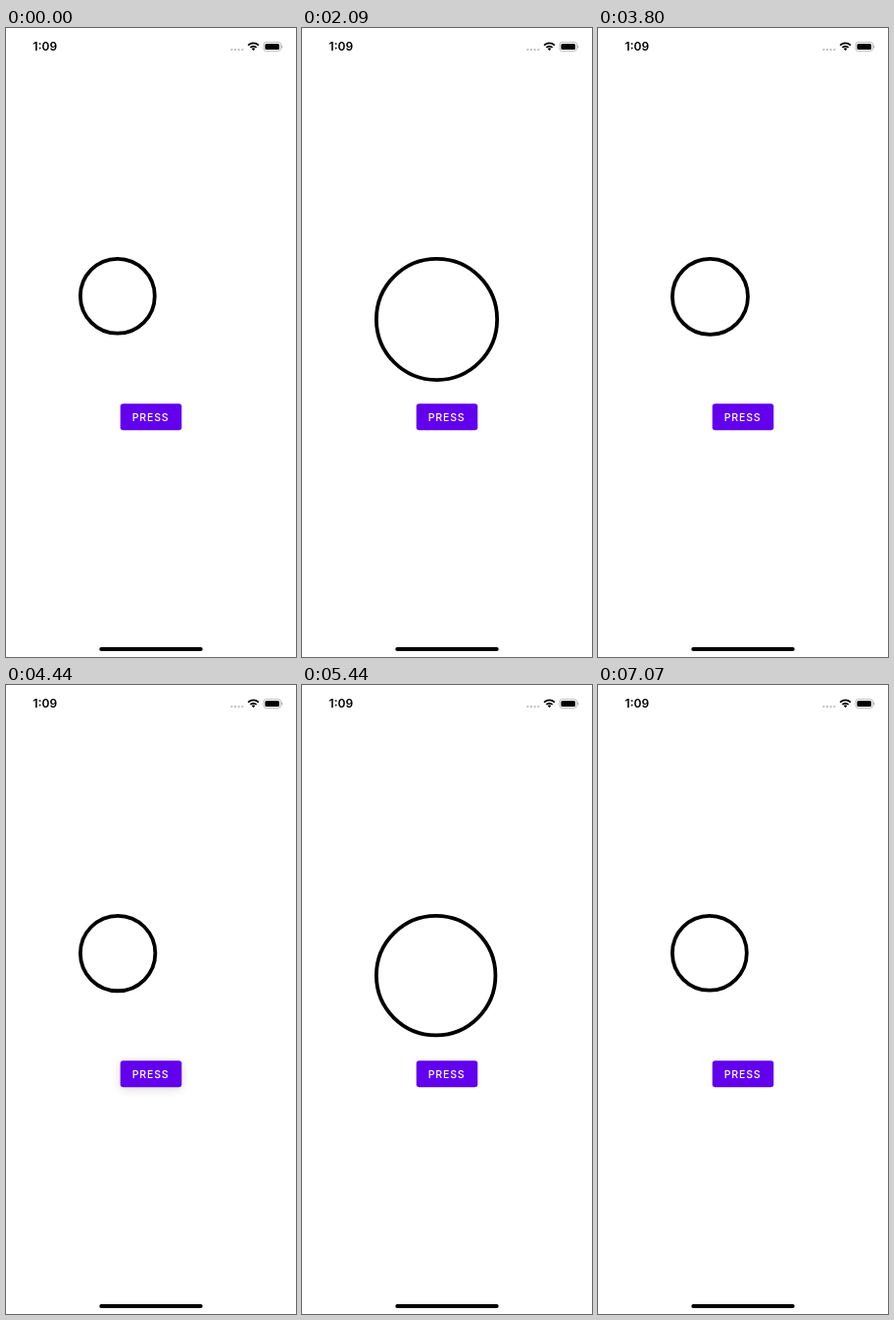
Animation of 296x640 px, one loop 7.1 s. Source, as an HTML page with a canvas:

```html
<!DOCTYPE html>
<html lang="en">
<head>
<meta charset="utf-8">
<title>Spring circle</title>
<style>
html, body { margin: 0; width: 100%; height: 100%; overflow: hidden; background: #fff; }
canvas { display: block; width: 296px; height: 640px; }
</style>
</head>
<body>
<canvas id="stage"></canvas>
<script>
const W = 296, H = 640, LOOP = 7100;
const PT = W / 390; // layout points to pixels
const FONT = 'Inter, Roboto, "Liberation Sans", sans-serif';
const canvas = document.getElementById('stage');
const ctx = canvas.getContext('2d');
const dpr = window.devicePixelRatio || 1;
canvas.width = W * dpr;
canvas.height = H * dpr;

// Each press: finger down, finger up, radius it springs to
const presses = [
  { down: 1400, up: 1548, r: 80 },
  { down: 2850, up: 3056, r: 50 },
  { down: 4290, up: 4420, r: 80 },
  { down: 5600, up: 5727, r: 50 }
];

// The screen refreshes in runs of even steps: first, last, count
const runs = [
  [1430, 2090, 7], [2190, 2870, 7], [2990, 3090, 2], [3190, 3700, 6],
  [3800, 4120, 4], [4330, 4860, 6], [4980, 4980, 1], [5090, 5770, 7],
  [5880, 5880, 1], [5980, 6520, 6], [6620, 7070, 5]
];
const ticks = [0];
for (const [a, b, n] of runs)
  for (let i = 0; i < n; i++) ticks.push(n > 1 ? a + (b - a) * i / (n - 1) : a);

function lastTick(t) {
  let k = 0;
  for (const x of ticks) if (x <= t + 0.01) k = x;
  return k;
}

// Damped spring: mass 1, stiffness 100, damping 10
function spring(ms) {
  const t = ms / 1000, w = Math.sqrt(75);
  return 1 - Math.exp(-5 * t) * (Math.cos(w * t) + 5 / w * Math.sin(w * t));
}

function radius(t) {
  let from = 50, r = 50;
  for (const p of presses) {
    if (t < p.up) break;
    r = from + (p.r - from) * spring(t - p.up);
    from = p.r;
  }
  return r;
}

function elevation(t) {
  for (const p of presses) {
    if (t < p.down || t > p.up + 150) continue;
    const rise = Math.min(1, (Math.min(t, p.up) - p.down) / 180);
    return t < p.up ? rise : rise * (1 - (t - p.up) / 150);
  }
  return 0;
}

function box(x, y, w, h, r, color) {
  ctx.fillStyle = color;
  ctx.beginPath();
  ctx.roundRect(x, y, w, h, r);
  ctx.fill();
}

function text(str, x, y, font, color, spacing) {
  ctx.font = font + ' ' + FONT;
  ctx.letterSpacing = spacing + 'px';
  ctx.fillStyle = color;
  ctx.fillText(str, x, y);
}

function wifi(x, y) {
  const a = -Math.PI * 0.75, b = -Math.PI * 0.25;
  ctx.strokeStyle = ctx.fillStyle = '#000';
  ctx.lineWidth = 1.8;
  for (const r of [4.4, 7.6]) {
    ctx.beginPath();
    ctx.arc(x, y, r, a, b);
    ctx.stroke();
  }
  ctx.beginPath();
  ctx.moveTo(x, y);
  ctx.arc(x, y, 2.5, a, b);
  ctx.fill();
}

function statusBar() {
  text('1:09', 27.6, 23, '600 12px', '#000', 0);
  for (let i = 0; i < 4; i++) box(229.3 + i * 3.6, 21, 2.2, 2, 1, '#b8b8b8');
  wifi(252.5, 23);
  ctx.strokeStyle = '#a6a6a6';
  ctx.lineWidth = 0.8;
  ctx.beginPath();
  ctx.roundRect(262.9, 14.4, 17.6, 9, 2.6);
  ctx.stroke();
  box(264.4, 15.9, 14.6, 6, 1.5, '#000');
  box(281.3, 17.4, 1, 3, 0.5, '#a6a6a6');
}

function button(level) {
  ctx.save();
  if (level > 0) {
    ctx.shadowColor = `rgba(0,0,0,${0.24 * level})`;
    ctx.shadowBlur = 10 * dpr;
    ctx.shadowOffsetY = 2 * dpr;
  }
  box(116.7, 382.2, 62.6, 27, 3, '#6200ee');
  ctx.restore();
  text('PRESS', 128.8, 399.6, '500 10.6px', '#fff', PT);
}

function ring(r) {
  const half = (r + 2.5) * PT;
  ctx.strokeStyle = '#000';
  ctx.lineWidth = 5 * PT;
  ctx.beginPath();
  ctx.arc(74 + half, 232.9 + half, r * PT, 0, Math.PI * 2);
  ctx.stroke();
}

function draw(t) {
  ctx.setTransform(dpr, 0, 0, dpr, 0, 0);
  ctx.fillStyle = '#fff';
  ctx.fillRect(0, 0, W, H);
  statusBar();
  ring(radius(t));
  button(elevation(t));
  box(95.3, 630, 105.4, 3.9, 1.95, '#000');
}

const start = performance.now();
function frame() {
  draw(lastTick((performance.now() - start) % LOOP));
  requestAnimationFrame(frame);
}
frame();
</script>
</body>
</html>
```
